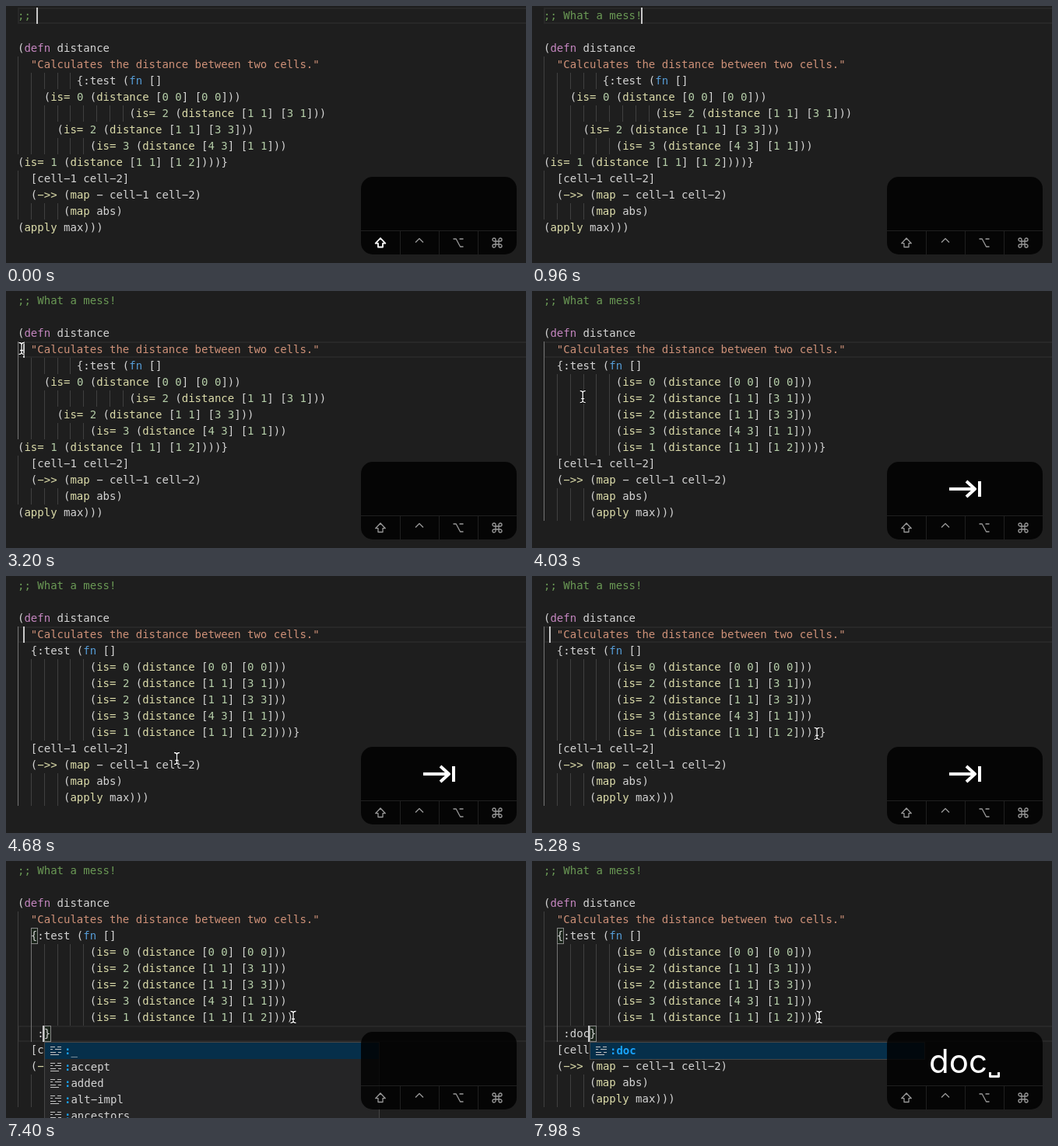
Write an HTML page that moves like this. It is 668 px wide and 331 px high and loops after 8 s.

```html
<!DOCTYPE html>
<html lang="en">
<head>
<meta charset="utf-8">
<title>Formatting Clojure code</title>
<style>
  html, body { margin: 0; width: 100%; height: 100%; overflow: hidden; background: #1e1e1e; }
  #stage { position: relative; width: 668px; height: 331px; overflow: hidden; background: #1e1e1e;
    font: 14px/21px "DejaVu Sans Mono", monospace; color: #d4d4d4; white-space: pre; }
  #stage div { position: absolute; box-sizing: border-box; }
  #stage #editor { left: 0; top: 0; width: 668px; height: 331px; }
  svg { position: absolute; left: 0; top: 0; }
  .current { left: 15px; right: 0; height: 21px; border: 2px solid #282828; border-right: 0; }
  .guide { width: 1px; background: #404040; }
  .guide.active { background: #747474; }
  .match { width: 9px; height: 21px; border: 1px solid #888; background: rgba(0, 100, 0, .1); }
  .caret { width: 2px; height: 21px; background: #c8c8c8; }
  .com { color: #6a9955; }
  .str { color: #ce9178; }
  .def { color: #c586c0; }
  .fn { color: #569cd6; }
  .num { color: #b5cea8; }
  .call { color: #dcdcaa; }
  .popup { top: 233px; width: 431px; border: 1px solid #454545; background: #252526; overflow: hidden; }
  .item { left: 0; width: 100%; height: 21px; padding-left: 25px; }
  .item:first-child { background: #062f4a; }
  .item b { color: #18a3ff; }
</style>
</head>
<body>
<div id="stage">
  <div id="editor"></div>
  <svg id="panel" width="668" height="331" fill="none" stroke-linejoin="round">
    <rect x="456" y="220" width="200" height="100" rx="15" fill="#000" fill-opacity=".82"/>
    <path d="M456 289.5H656M506.5 290V320M556.5 290V320M606.5 290V320" stroke="#1f1f1f"/>
    <g id="mods"></g>
    <g id="keys" stroke="#fff" stroke-width="4"></g>
  </svg>
  <svg id="pointer" width="20" height="20" viewBox="-10 -10 20 20" fill="none">
    <defs><path id="beam" d="M-3.5-7.5Q-.5-7.5 0-5.5Q.5-7.5 3.5-7.5M0-6V6M-3.5 7.5Q-.5 7.5 0 5.5Q.5 7.5 3.5 7.5M-2 2.5H2"/></defs>
    <use href="#beam" stroke="#000" stroke-width="3"/>
    <use href="#beam" stroke="#fff" stroke-width="1.3"/>
  </svg>
</div>
<script>
const LOOP = 8000, LEFT = 15, TOP = 2, ROW = 21, COL = 8.428;
const $ = id => document.getElementById(id);
const colX = col => LEFT + col * COL;
const rowY = row => TOP + row * ROW;
const indent = (n, text) => ' '.repeat(n) + text;

// Documents
const checks = ['0 (distance [0 0] [0 0]))', '2 (distance [1 1] [3 1]))', '2 (distance [1 1] [3 3]))',
  '3 (distance [4 3] [1 1]))', '1 (distance [1 1] [1 2])))}'];
const code = (comment, testCol, checkCols, tailCol) => [
  comment, '', '(defn distance',
  '  "Calculates the distance between two cells."',
  indent(testCol, '{:test (fn []'),
  ...checks.map((c, i) => indent(checkCols[i], '(is= ' + c)),
  '  [cell-1 cell-2]', '  (->> (map - cell-1 cell-2)',
  '       (map abs)', indent(tailCol, '(apply max)))')];
const messy = comment => code(comment, 9, [4, 17, 6, 11, 0], 0);
const title = ';; What a mess!';
const tidy = code(title, 2, [11, 11, 11, 11, 11], 7);
const split = (col, text) => {
  const lines = tidy.slice();
  lines.splice(9, 1, lines[9].slice(0, -1), indent(col, text + '}'));
  return lines;
};

// Key shapes
const icons = [
  'M0-6L6.3.7H3V5.5H-3V.7H-6.3Z',
  'M-5-.5L0-5.5L5-.5',
  'M-6.5-5H-2.8L2.5 5H6.5M1.5-5H6.5',
  'M-2 2V-4a2 2 0 1 0-2 2H4a2 2 0 1 0-2-2V4a2 2 0 1 0 2-2H-4a2 2 0 1 0 2 2Z'];
const path = (d, x = 0) => `<path transform="translate(${x})" d="${d}"/>`;
const label = (s, x = 556) => `<text x="${x}" y="273" text-anchor="middle" fill="#fff" stroke="none" ` +
  `style="font:42px Inter,sans-serif">${s}</text>`;
const tabKey = x => path('M536 255H567M558 245L569 255L558 265M575 245V265', x);
const returnKey = path('M563 255H589a9.5 9.5 0 0 0 0-19H587M572 245L562 255L572 265');
const pasteKey = `<path transform="translate(539.5 254) scale(2.5)" stroke-width="1.5" d="${icons[3]}"/>` + label('V', 574);
const spaceKey = '<path stroke-width="3" d="M588.5 272V277.5H599.5V272"/>';

const popup = (col, hits, ...items) => ({ col, hits, items });
const close = col => [[4, 2], [10, col]];
const typed = text => ({ lines: split(3, text), caret: [10, 3 + text.length], on: true, match: close(3 + text.length) });
const dWords = [':default', ':deprecated', ':doc', ':dynamic', ':added'];

// Time and what changes then; guide is [column, first row, last row]
const steps = [
  [0, { lines: messy(';; '), caret: [0, 3], on: true, mod: 0, keys: '', match: [], guide: null, popup: null }],
  [120, { on: false }],
  [390, { mod: -1 }],
  [630, { on: true, mod: 3 }],
  [750, { lines: messy(title), caret: [0, 15], keys: pasteKey }],
  [960, { mod: -1, keys: '' }],
  [1260, { on: false }],
  [1740, { on: true }],
  [2270, { on: false }],
  [2780, { on: true }],
  [3200, { caret: [3, 1], guide: [0, 3, 8] }],
  [3680, { on: false }],
  [3800, { lines: tidy, keys: tabKey(0), guide: [0, 3, 13] }],
  [4210, { on: true }],
  [4720, { on: false }],
  [5230, { on: true }],
  [5750, { on: false }],
  [6110, { caret: [9, 42], on: true, match: [[4, 2], [9, 42]], guide: [10, 5, 9] }],
  [6350, { lines: split(10, ''), caret: [10, 10], match: close(10), guide: [8, 5, 10], keys: tabKey(-25) + returnKey }],
  [6500, typed('')],
  [6560, { guide: [2, 5, 10] }],
  [6980, { on: false, mod: 0, keys: '' }],
  [7340, { ...typed(':'), keys: label(':') }],
  [7400, { mod: -1, keys: '', popup: popup(4, 1, ':_', ':accept', ':added', ':alt-impl', ':ancestors') }],
  [7630, { ...typed(':d'), keys: label('d') }],
  [7690, { popup: popup(5, 2, ...dWords) }],
  [7750, { ...typed(':do'), keys: label('do') }],
  [7810, { popup: popup(6, 3, ':doc') }],
  [7870, { ...typed(':doc'), keys: label('doc') }],
  [7920, { popup: popup(7, 4, ':doc') }],
  [7980, { keys: label('doc', 547.5) + spaceKey }]];
let last = {};
const states = steps.map(([, change]) => last = { ...last, ...change });

// Pointer route: time, x, y
const route = [[2270, 162, 285], [2329, 162, 285], [2330, 132, 205], [2450, 132, 205], [3150, 20, 74],
  [3640, 20, 74], [3750, 30, 57], [4030, 65, 136], [4510, 170, 226], [4700, 225, 236],
  [5280, 366, 203], [5350, 371, 200], [5570, 369, 201], [LOOP, 369, 201]];

const dash = s => s.replace(/-/g, '−');
const box = (cls, x, y, style = '', inner = '') =>
  `<div class="${cls}" style="left:${x}px;top:${y}px;${style}">${inner}</div>`;

function paint(text) {
  return dash(text).replace(/;.*|".*"|\b(?:defn|fn)\b|(?<=\()[a-z=−>]+|(?<![\w−])\d/g, s => {
    const cls = s[0] === ';' ? 'com' : s[0] === '"' ? 'str' : s === 'defn' ? 'def'
      : s === 'fn' ? 'fn' : /\d/.test(s) ? 'num' : 'call';
    return `<span class="${cls}">${s}</span>`;
  });
}

function guides(line, row, active) {
  let html = '';
  for (let col = 0; col < line.search(/\S/); col += 2) {
    const lit = active && col === active[0] && row >= active[1] && row <= active[2];
    html += box('guide' + (lit ? ' active' : ''), Math.round(colX(col)), rowY(row), 'height:21px');
  }
  return html;
}

function list({ col, hits, items }) {
  const rows = items.map((s, i) => box('item', 0, i * ROW, '',
    `<b>${s.slice(0, hits)}</b>${dash(s.slice(hits))}` +
    '<svg width="24" height="21" stroke="#c5c5c5" fill="none"><path d="M7 5.5H13M16 5.5H21M7 8.5H10M13 8.5H21M7 12.5H14M17 12.5H21M7 15.5H18"/></svg>'));
  return box('popup', Math.round(colX(col)), 233, `height:${items.length * ROW + 2}px`, rows.join(''));
}

function draw(s) {
  const [row, col] = s.caret;
  $('editor').innerHTML = `<div class="current" style="top:${rowY(row)}px"></div>` +
    s.lines.map((line, i) => guides(line, i, s.guide)).join('') +
    s.match.map(([r, c]) => box('match', Math.round(colX(c)), rowY(r))).join('') +
    s.lines.map((line, i) => box('', LEFT, rowY(i), '', paint(line))).join('') +
    (s.on ? box('caret', Math.floor(colX(col)) - 1, rowY(row)) : '') +
    (s.popup ? list(s.popup) : '');
  $('mods').innerHTML = icons.map((d, i) => `<path transform="translate(${481 + 50 * i} 305)" d="${d}" ` +
    `stroke="${i === s.mod ? '#fff' : '#999'}" stroke-width="${i === s.mod ? 1.8 : 1.3}"/>`).join('');
  $('keys').innerHTML = s.keys;
}

function movePointer(t) {
  const shown = t >= route[0][0];
  $('pointer').style.display = shown ? '' : 'none';
  if (!shown) return;
  const i = route.findIndex(p => p[0] > t);
  const [t0, x0, y0] = route[i - 1], [t1, x1, y1] = route[i];
  const k = (t - t0) / (t1 - t0);
  $('pointer').style.transform = `translate(${x0 + (x1 - x0) * k - 10}px,${y0 + (y1 - y0) * k - 10}px)`;
}

let shownStep = -1;
function tick() {
  const t = performance.now() % LOOP;
  const step = steps.findLastIndex(([at]) => at <= t);
  if (step !== shownStep) draw(states[shownStep = step]);
  movePointer(t);
  requestAnimationFrame(tick);
}
tick();
</script>
</body>
</html>
```
